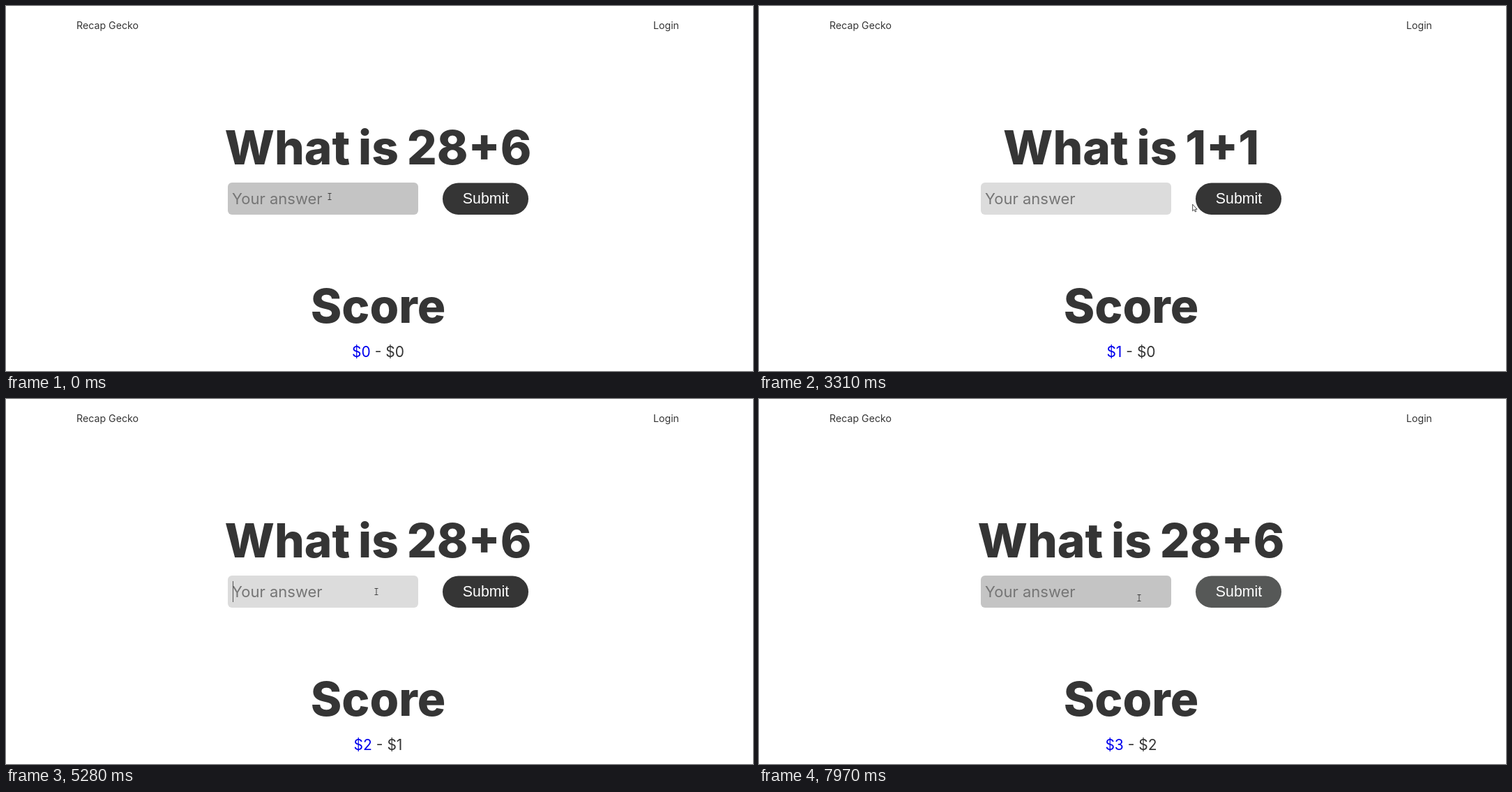
These frames come from a looping animation (1071x523 px, 7.99 s). An HTML page:

```html
<!DOCTYPE html>
<html lang="en">
<head>
<meta charset="utf-8">
<title>Quiz</title>
<style>
  html, body { margin: 0; width: 100%; height: 100%; overflow: hidden; background: #fff; }
  svg { display: block; width: 100%; height: 100%; font: 400 21px Inter, sans-serif; fill: #353535; }
  .big { font-size: 67.5px; font-weight: 800; word-spacing: -3px; text-anchor: middle; }
  .nav { font-size: 14.2px; }
  .cursor { stroke: #222; stroke-width: .8; fill: #fff; }
</style>
</head>
<body>
<svg viewBox="0 0 1071 523">
  <text class="nav" x="101" y="33">Recap Gecko</text>
  <text class="nav" x="965" y="33" text-anchor="end">Login</text>
  <text class="big" id="question" x="533.5" y="226.5"></text>
  <rect id="field" x="318" y="253" width="273" height="46" rx="6"/>
  <text id="answer" x="324" y="283.5" font-size="22"></text>
  <rect id="caret" y="261" width="1" height="30" fill="#555"/>
  <rect id="button" x="626" y="253.5" width="123" height="45.5" rx="22.75"/>
  <text x="688" y="283" text-anchor="middle" fill="#fff"
        style="font: 21.3px 'Liberation Sans', Arial, sans-serif">Submit</text>
  <text class="big" x="533.5" y="454">Score</text>
  <text x="533.5" y="503" text-anchor="middle"><tspan id="mine" fill="#00e"></tspan> - <tspan id="theirs"></tspan></text>
  <g class="cursor">
    <path id="beam" fill="none" d="M-2.5-4.5H2.5M0-4.5V4.5M-2.5 4.5H2.5"/>
    <path id="arrow" d="M-2.5-5V4.5L-.3 2.6 1.2 5.8 2.6 5.2 1.2 2.1H4Z"/>
    <path id="hand" d="M-1.5 2V-5.5Q-.5-7 .5-5.5V-1.5L4-.8Q5-.5 5 1 5 4 3.5 6.5H-1.5L-4.5 2Q-4.5 .3-3 .7Z"/>
  </g>
</svg>
<script>
const LOOP = 7990, BLINK = 535, REPLY = 80, RIVAL = 7790;
const el = id => document.getElementById(id);

// Pointer trips: start, duration, destination
const trips = [
  [140, 520, 472, 275], [1450, 290, 666, 281], [2300, 780, 472, 281], [3130, 550, 690, 280],
  [4395, 525, 531, 276], [6570, 310, 690, 280], [7750, 220, 545, 285]
];

// Turns: click the field, type, press the button
const turns = [
  { click: 480, type: 1450, press: 2100 },
  { click: 2740, type: 3340, press: 3840 },
  { click: 5080, type: 6350, press: 7480 }
];

// Each trip eases out and sags slightly below the straight line
function pointer(t) {
  let x = 464, y = 273;
  for (const [start, duration, toX, toY] of trips) {
    const u = Math.min(1, Math.max(0, (t - start) / duration));
    const k = 1 - (1 - u) ** 3;
    const sag = Math.abs(toX - x) * .05 * Math.sin(Math.PI * k);
    x += (toX - x) * k;
    y += (toY - y) * k + sag;
  }
  return [x, y];
}

function show(id, on) {
  el(id).style.display = on ? '' : 'none';
}

function draw(now) {
  const t = now % LOOP;

  const solved = turns.filter(turn => t >= turn.press + REPLY).length;
  const round = solved + (t >= RIVAL);
  el('question').textContent = 'What is ' + (round % 2 ? '1+1' : '28+6');
  el('mine').textContent = '$' + solved;
  el('theirs').textContent = '$' + Math.floor(round / 2);

  const turn = turns.findLast(s => t >= s.click);
  const pressed = !!turn && t >= turn.press;
  const focused = !!turn && !pressed;
  const typed = !!turn && t >= turn.type && t < turn.press + REPLY;
  el('answer').textContent = typed ? '1' : 'Your answer';
  el('answer').style.fill = typed ? '#505050' : '#757575';
  el('field').style.fill = focused ? '#dcdcdc' : '#c4c4c4';

  const blinkFrom = focused && (typed ? turn.type : turn.click);
  show('caret', focused && Math.floor((t - blinkFrom) / BLINK) % 2 === 0);
  el('caret').setAttribute('x', typed ? 332 : 325);

  const [x, y] = pointer(t);
  el('button').style.fill = pressed ? '#565857' : x > 636 ? '#3b3d41' : '#353535';
  const kind = x < 591 ? 'beam' : x < 626 ? 'arrow' : 'hand';
  for (const id of ['beam', 'arrow', 'hand']) show(id, id === kind);
  el(kind).setAttribute('transform', `translate(${x} ${y})`);
  requestAnimationFrame(draw);
}
draw(performance.now());
</script>
</body>
</html>
```
